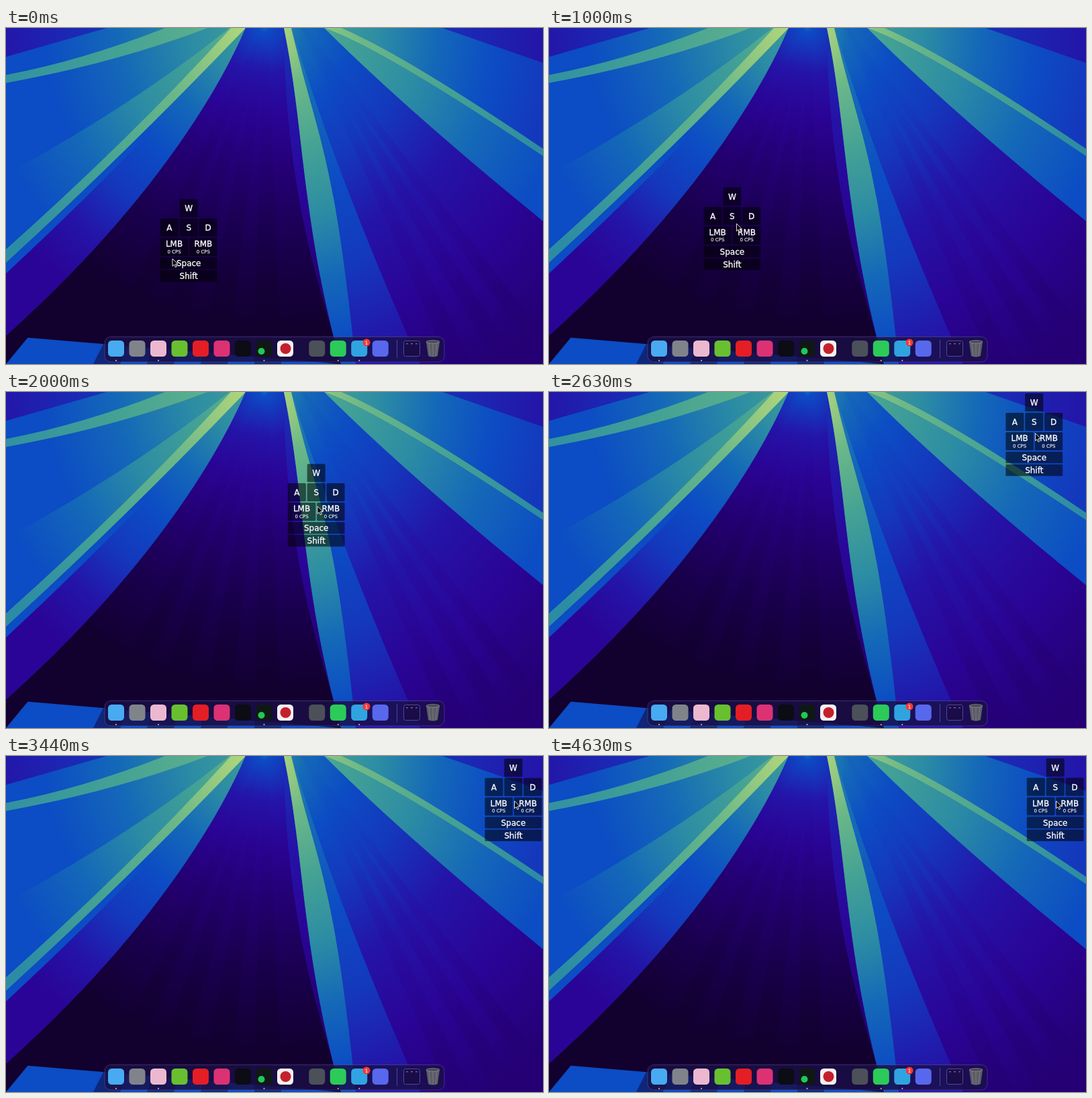
An HTML page for the animation above (4690 ms loop, 800x501 px).

```html
<!DOCTYPE html>
<html lang="en">
<head>
<meta charset="utf-8">
<title>Key overlay on a desktop</title>
<style>
  html, body { margin: 0; width: 100%; height: 100%; overflow: hidden; background: #12002e; }
  svg { display: block; }
  text { font: 12px "DejaVu Sans", sans-serif; fill: #fff; stroke: #fff; stroke-width: .3; text-anchor: middle; }
  text.small { font-size: 7px; stroke-width: .1; }
</style>
</head>
<body>
<svg width="800" height="501" viewBox="0 0 800 501">
  <defs id="defs"></defs>
  <g id="wallpaper"></g>
  <g id="dock">
    <rect x="147" y="460.5" width="506" height="37.5" rx="9" fill="#1a1048" fill-opacity=".8" stroke="#8078c0" stroke-opacity=".35"/>
  </g>
  <g id="panel"></g>
  <path id="cursor" d="M0 0V11.2L2.6 8.8 4.3 12.7 6.2 11.9 4.5 8.1H8Z" fill="#000" stroke="#fff" stroke-width=".9"/>
</svg>
<script>
const $ = id => document.getElementById(id);

function add(parent, tag, attrs, text) {
  const el = document.createElementNS('http://www.w3.org/2000/svg', tag);
  for (const k in attrs) el.setAttribute(k, attrs[k]);
  if (text) el.textContent = text;
  return parent.appendChild(el);
}

// Wallpaper: beams between curved edges, shaded along one ramp from bright to dark
const ramp = ('#c0dc78 #6cb888 #44a294 #2c8ca4 #1468b8 #0c4cc4 '
  + '#1438bc #2414a8 #2a0496 #240074 #1a0050 #12002e').split(' ');
let beams = 0;

// An edge starts at the top of the stage; its later points steer a line or Bezier curve
const edge = (x, ...points) => [[x, 0], ...points];
const curve = points => ' LQC'[points.length - 1] + points.slice(1).join(' ');

function beam(a, b, near, far, reach, power = 1, opacity = 1) {
  const id = 'beam' + beams++, steps = far - near;
  const gradient = add($('defs'), 'radialGradient',
    { id, gradientUnits: 'userSpaceOnUse', cx: 385, cy: 0, r: reach });
  for (let i = 0; i <= steps; i++)
    add(gradient, 'stop', { offset: (i / steps) ** power, 'stop-color': ramp[near + i] });
  const back = [...b].reverse();
  add($('wallpaper'), 'path',
    { d: `M${a[0]}${curve(a)}L${back[0]}${curve(back)}Z`, fill: `url(#${id})`, opacity });
}

const leftWall = edge(0, [0, 501]), rightWall = edge(800, [800, 501]);
const bandTop = edge(333, [190, 115], [0, 218]);
const glowTop = edge(335, [190, 160], [0, 330]);
const glowBottom = edge(357, [175, 190], [0, 350]);
const centreLeft = edge(357, [310, 110], [200, 280], [0, 459]);
const stripLeft = edge(414, [445, 150], [440, 290], [499, 501]);
const stripRight = edge(425, [465, 170], [488, 180], [521, 501]);
const fringe = edge(425, [460, 110], [510, 260], [617, 501]);
const wideBottom = edge(474, [600, 125], [800, 288]);
const rimBottom = edge(474, [560, 30], [800, 191]);
const rimTop = edge(500, [590, 38], [800, 180]);

beam(leftWall, rightWall, 2, 5, 330);
beam(leftWall, edge(150, [0, 43]), 5, 7, 400);
beam(edge(237, [115, 48], [0, 70]), edge(300, [165, 52], [0, 82]), 1, 3, 440);
beam(bandTop, glowTop, 1, 5, 430);
beam(glowBottom, centreLeft, 2, 8, 480);
beam(glowBottom, edge(357, [200, 180], [0, 366]), 2, 5, 240);
beam(glowTop, glowBottom, 0, 3, 480);

beam(edge(357, [310, 110], [200, 280], [0, 459]), edge(414, [0, 501]), 4, 11, 450, 2.2);
beam(centreLeft, stripLeft, 4, 11, 450, 2.2);
for (let x = 130; x < 450; x += 80)
  beam(edge(382, [x, 501]), edge(390, [x + 40, 501]), 4, 11, 390, 2.2, .5);
beam(edge(414, [415, 200], [465, 380]), stripLeft, 6, 9, 400);

beam(stripLeft, rightWall, 2, 9, 600, 1.8);
for (let x = 660; x < 860; x += 70)
  beam(edge(440, [x, 501]), edge(446, [x + 35, 501]), 2, 9, 520, 1.8, .5);
beam(stripRight, fringe, 3, 7, 500);
beam(stripLeft, stripRight, 0, 5, 480);
beam(rimBottom, wideBottom, 1, 5, 470);
beam(rimTop, rightWall, 1, 6, 430);
beam(edge(650, [800, 52]), rightWall, 5, 7, 420);
beam(rimTop, rimBottom, 0, 3, 440);

// Dock: evenly spaced tiles with a half-step gap before the last four
const dock = $('dock');
const spot = (cx, cy, r, fill) => add(dock, 'circle', { cx, cy, r, fill });
const slot = i => 164 + 31.5 * (i < 9 ? i : i + .5);
const tiles = ['#48aaf0', '#80848a', '#ecb8d0', '#68c030', '#e41e24', '#dc3274', '#0c0c14',
  '#101816', '#f4f0f0', '#4c5058', '#2cca58', '#30a4e0', '#5868ec'];
tiles.forEach((fill, i) =>
  add(dock, 'rect', { x: slot(i) - 12, y: 466, width: 24, height: 24, rx: 5.5, fill }));
spot(380.5, 482, 5, '#20c858');
spot(416.5, 478, 8, '#c4202c');
spot(537, 469, 5.5, '#f43838');
add(dock, 'text', { x: 537, y: 471.6, class: 'small' }, '1');
for (const i of [0, 2, 7, 10, 11]) spot(slot(i), 495.8, 1.1, '#b8b4d4');

add(dock, 'path', { d: 'M582.5 465V492', stroke: '#6860a0', 'stroke-opacity': .7 });
add(dock, 'rect', { x: 592.5, y: 466.5, width: 24, height: 23, rx: 3, fill: '#1a0c48', stroke: '#504890' });
['#4060d0', '#d04050', '#4060d0'].forEach((fill, i) =>
  add(dock, 'rect', { x: 596 + i * 7, y: 470, width: 3, height: 1.5, fill }));
add(dock, 'path', { d: 'M626 468L629 489Q636 492 643 489L646 468Z', fill: '#5c5c68' });
add(dock, 'path', { d: 'M630 470L632 489M636 470V490M642 470L640 489', stroke: '#80808a', 'stroke-width': .8 });
add(dock, 'ellipse', { cx: 636, cy: 468, rx: 10, ry: 2.2, fill: '#484852', stroke: '#90909a', 'stroke-width': .8 });

// Key overlay: each row shares the panel width equally
const panel = $('panel');
const LEFT = 229.8, WIDTH = 84.8, GAP = 1.8;
function row(y, height, labels, counter) {
  const width = (WIDTH - GAP * (labels.length - 1)) / labels.length;
  labels.forEach((label, i) => {
    if (!label) return;
    const x = LEFT + i * (width + GAP), cx = x + width / 2, cy = y + height / 2;
    add(panel, 'rect', { x, y, width, height, rx: 1.5, fill: '#000', 'fill-opacity': .55 });
    add(panel, 'text', { x: cx, y: cy + (counter ? -.5 : 4.4) }, label);
    if (counter) add(panel, 'text', { x: cx, y: cy + 9.3, class: 'small' }, counter);
  });
}
row(255.2, 27, ['', 'W', '']);
row(284.1, 27, ['A', 'S', 'D']);
row(313, 27, ['LMB', 'RMB'], '0 CPS');
row(342, 17.4, ['Space']);
row(361, 17.4, ['Shift']);

// Motion: the pointer reaches the panel, then drags it in a few eased pulls
function ease(t, start, end) {
  const u = Math.min(1, Math.max(0, (t - start) / (end - start)));
  return u * u * (3 - 2 * u);
}
const panelAt = t => [
  190 * ease(t, 970, 1850) + 261 * ease(t, 2050, 2640) + 28 * ease(t, 2800, 3050)
    + 5 * ease(t, 3150, 3500) - 2 * ease(t, 4000, 4500),
  -148 * ease(t, 770, 1850) - 109 * ease(t, 2050, 2700) + 8 * ease(t, 2800, 3050)
    - 2.5 * ease(t, 3150, 3500)
];

const LOOP = 4690, STEP = LOOP / 75;
const place = (el, x, y) => el.setAttribute('transform', `translate(${x} ${y})`);

function draw(now) {
  const t = Math.floor((now % LOOP + 5) / STEP) % 75 * STEP;
  place(panel, ...panelAt(t));
  // the panel trails the pointer by one step
  const [x, y] = panelAt(t + STEP), reach = ease(t, 100, 650);
  place($('cursor'), 248 + 25.5 * reach + x, 344 - 25.5 * reach + y);
  requestAnimationFrame(draw);
}
draw(performance.now());
</script>
</body>
</html>
```
